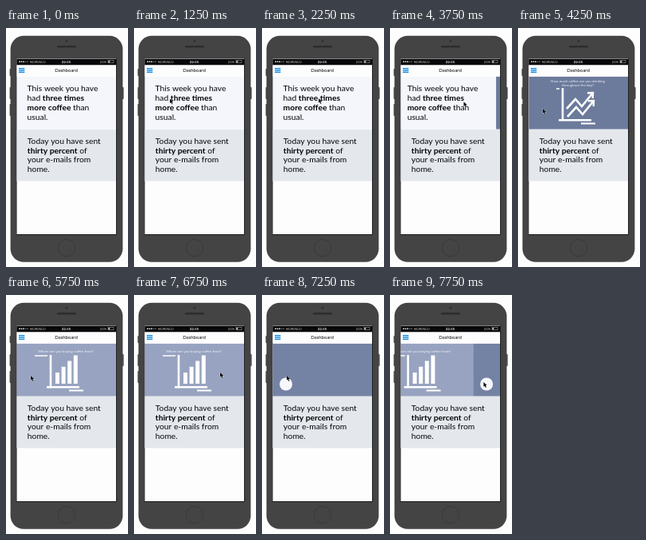
Recreate the animation shown at these times as an HTML page with a canvas. Size 153 by 299 pixels, loop 8 s.

```html
<!DOCTYPE html>
<html lang="en">
<head>
<meta charset="utf-8">
<title>Dashboard</title>
<style>
html, body { margin: 0; width: 100%; height: 100%; overflow: hidden; background: #fdfdfe; }
canvas { display: block; width: 100vw; height: 100vh; }
</style>
</head>
<body>
<canvas id="stage"></canvas>
<script>
const W = 153, H = 299, LOOP = 8000, STEP = 250;
const LEFT = 13.5, PAGE = 124.5, TOP = 60.5, MID = 126.7, BOTTOM = 191.5;
const SWIPE = 500, RETURN = 900, DRAG_BACK = 7420, APPEAR = 1250;
const canvas = document.getElementById('stage');
const c = canvas.getContext('2d');

// Each swipe turns one page; x and y are where the pointer grabs it.
const swipes = [
  { start: 3690, x: 95, y: 92 },
  { start: 5250, x: 105, y: 100 },
  { start: 6750, x: 108, y: 97 }
];

const mix = (a, b, f) => a + (b - a) * f;

function ease(t, start, length) {
  const u = Math.min(1, Math.max(0, (t - start) / length));
  return u * u * (3 - 2 * u);
}

function scrollAt(t) {
  const pages = swipes.reduce((sum, s) => sum + ease(t, s.start, SWIPE), 0);
  return PAGE * (pages - ease(t, DRAG_BACK, SWIPE));
}

function pointerAt(t) {
  let x = 45, y = 88.5;
  const move = (toX, toY, f) => { x = mix(x, toX, f); y = mix(y, toY, f); };
  move(71, 88, ease(t, APPEAR, 1000));
  move(32, 94, ease(t, 2250, 500));
  for (const s of swipes) {
    move(s.x, s.y, ease(t, s.start - RETURN, RETURN));
    move(31, 101, ease(t, s.start, SWIPE));
  }
  move(149, 112, ease(t, DRAG_BACK, SWIPE));
  return [x, y];
}

function rect(x, y, w, h, color, r = 0) {
  c.fillStyle = color;
  c.beginPath();
  c.roundRect(x, y, w, h, r);
  c.fill();
}

function circle(x, y, r, color) {
  c.fillStyle = color;
  c.beginPath();
  c.arc(x, y, r, 0, 2 * Math.PI);
  c.fill();
}

function line(points, width, color = '#fff') {
  c.strokeStyle = color;
  c.lineWidth = width;
  c.beginPath();
  points.forEach(([x, y]) => c.lineTo(x, y));
  c.stroke();
}

function text(s, x, y, size, color, align = 'left', weight = 400) {
  c.font = `${weight} ${size}px Lato, sans-serif`;
  c.textAlign = align;
  c.fillStyle = color;
  c.fillText(s, x, y);
}

// Asterisks switch bold on and off.
function paragraph(lines, x, y) {
  lines.forEach((s, row) => {
    let pen = x;
    s.split('*').forEach((part, i) => {
      text(part, pen, y + row * 11.9, 10.3, '#050507', 'left', i % 2 ? 700 : 400);
      pen += c.measureText(part).width;
    });
  });
}

function phone() {
  const button = (x, y, h) => rect(x, y, 2, h, '#4c4c4e', 0.8);
  button(4.6, 51, 9);
  button(4.6, 74, 15);
  button(4.6, 95, 15);
  button(145.6, 74, 15);
  rect(5.6, 9.8, 140.8, 283, '#444445', 16.5);
  circle(76, 16, 1.3, '#2c2c2e');
  rect(64, 22, 24, 2.6, '#2c2c2e', 1.3);
  c.strokeStyle = '#353536';
  c.lineWidth = 0.8;
  c.beginPath();
  c.arc(76, 275, 10.6, 0, 2 * Math.PI);
  c.stroke();
  rect(LEFT - 0.6, 38, PAGE + 1.2, 220.8, '#0c0c0e');
  rect(LEFT, 38, PAGE, 220, '#fdfdfe');
}

function header() {
  rect(LEFT, 38.4, PAGE, 8, '#08080a');
  for (let i = 0; i < 5; i++) circle(17 + i * 2.5, 42.2, 0.9, i < 3 ? '#ddd' : '#666');
  text('NORVELO', 30, 43.8, 4.2, '#c8c8c8');
  text('22:35', 75.5, 43.9, 4.5, '#eee', 'center', 700);
  text('22%', 126, 43.8, 4.2, '#c8c8c8', 'right');
  c.strokeStyle = '#bbb';
  c.lineWidth = 0.5;
  c.strokeRect(128, 40.6, 7, 3.2);
  rect(128.5, 41.1, 1.7, 2.2, '#ddd');
  rect(LEFT, 46.4, PAGE, TOP - 46.4, '#fdfdfe');
  for (let i = 0; i < 3; i++) rect(16, 50 + i * 2.3, 7.4, 1.4, '#168ae0');
  text('Dashboard', 75.5, 55.2, 6, '#0a0a0c', 'center');
}

function pageFill(color) {
  rect(LEFT, TOP, PAGE + 0.3, MID - TOP, color);
}

function axes(tickStart) {
  line([[56, 75], [56, 115.2], [92, 115.2]], 2.6);
  line([[51, 115.2], [56, 115.2]], 2.6);
  line([[tickStart, 76], [52, 76]], 1.6);
  line([[79, 119.6], [97, 119.6]], 2);
}

function trend(x, y) {
  c.save();
  c.translate(x, y);
  line([[0, 20], [11, 8], [19, 17], [33, 0]], 2.6);
  line([[26, 0.3], [33, 0], [32.7, 7]], 2.4);
  c.restore();
}

function firstCard() {
  pageFill('#f5f6fc');
  paragraph(['This week you have', 'had *three times', '*more coffee* than', 'usual.'], 26.6, 78.8);
}

function lineChart() {
  pageFill('#6c7a9c');
  text('How much coffee are you drinking', 75, 68.2, 4.5, '#eef0f6', 'center');
  text('throughout the day?', 75, 73.2, 4.5, '#eef0f6', 'center');
  axes(48);
  trend(61, 81);
  trend(62, 91);
}

function barChart() {
  pageFill('#97a3c0');
  text('Where are you buying coffee from?', 75, 72.4, 4.5, '#f2f4f9', 'center');
  axes(36);
  for (let i = 0; i < 4; i++) {
    const h = 14 + i * 7.2;
    rect(62 + i * 7.6, 111 - h, 5, h, '#fff');
  }
}

function lastPage() {
  pageFill('#7482a4');
  circle(LEFT + 16.5, 111.5, 8, '#f7f8fb');
}

function secondCard() {
  rect(LEFT, MID, PAGE, BOTTOM - MID, '#e4e8ed');
  paragraph(['Today you have sent', '*thirty percent* of', 'your e-mails from', 'home.'], 26.8, 144.6);
}

function cursor(x, y) {
  c.beginPath();
  [[0, 0], [0, 5.8], [1.4, 4.6], [2.5, 7], [3.5, 6.5], [2.5, 4.2], [4.3, 4]]
    .forEach(([dx, dy]) => c.lineTo(x + dx, y + dy));
  c.closePath();
  c.strokeStyle = 'rgba(255,255,255,.7)';
  c.lineWidth = 0.8;
  c.stroke();
  c.fillStyle = '#111';
  c.fill();
}

function draw(t) {
  rect(0, 0, W, H, '#fdfdfe');
  phone();
  secondCard();
  const offset = scrollAt(t);
  c.save();
  c.beginPath();
  c.rect(LEFT, TOP, PAGE, MID - TOP);
  c.clip();
  [firstCard, lineChart, barChart, lastPage].forEach((page, i) => {
    c.save();
    c.translate(i * PAGE - offset, 0);
    page();
    c.restore();
  });
  c.restore();
  header();
  if (t >= APPEAR) cursor(...pointerAt(t));
}

function resize() {
  const ratio = window.devicePixelRatio || 1;
  canvas.width = Math.round(innerWidth * ratio);
  canvas.height = Math.round(innerHeight * ratio);
}

const start = performance.now();
function tick() {
  const t = Math.max(0, performance.now() - start) % LOOP;
  c.setTransform(canvas.width / W, 0, 0, canvas.height / H, 0, 0);
  draw(Math.floor(t / STEP) * STEP);
  requestAnimationFrame(tick);
}
addEventListener('resize', resize);
resize();
tick();
</script>
</body>
</html>
```
